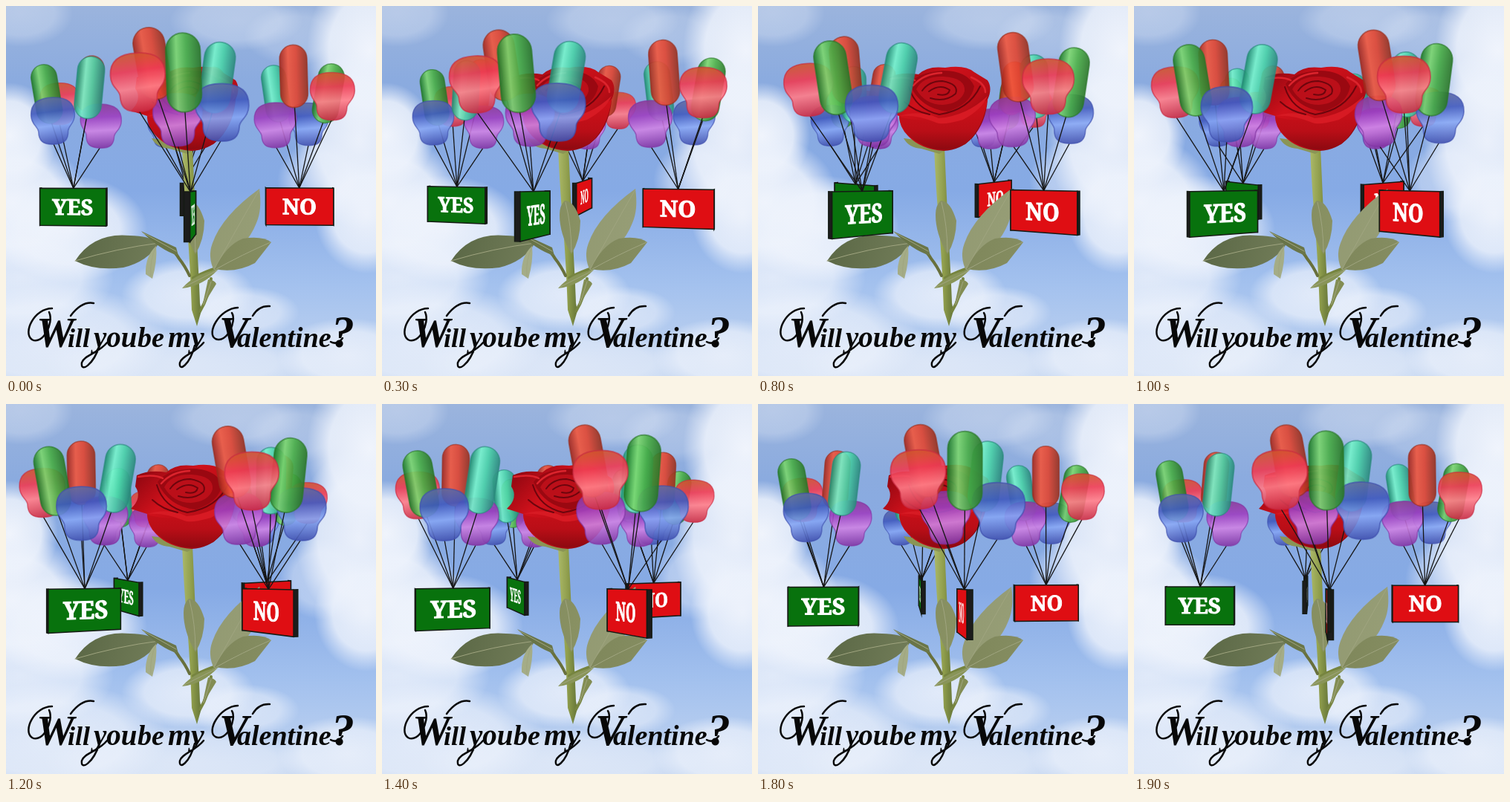
Recreate the animation shown at these times as an HTML page with a canvas. Size 498x498 px, loop 2 s.

```html
<!DOCTYPE html>
<html lang="en">
<head>
<meta charset="utf-8">
<title>Will you be my Valentine?</title>
<style>
html, body { margin: 0; width: 100%; height: 100%; overflow: hidden; background: #9db9e6; }
canvas { display: block; }
</style>
</head>
<body>
<canvas id="stage" width="498" height="498"></canvas>
<script>
const SIZE = 498;
const ctx = document.getElementById('stage').getContext('2d');
const RAD = Math.PI / 180;
const RADIUS = 152, CAMERA = 760, AXIS = 243.5, HORIZON = 204;
const HALF_W = 45, HALF_H = 25, HALF_DEPTH = 3;

// u: outward, v: along the direction of travel, y: relative to the horizon
const BALLOONS = [
  { kind: 'knob', u: 35, v: 51, y: -77, colors: ['#d0552c', '#ee3a52', '#ff7c88', '#c92a42'] },
  { kind: 'tube', u: -12, v: 43, y: -104, colors: ['#a5271d', '#f0553c', '#e04430', '#98301f'] },
  { kind: 'tube', u: 38, v: 4, y: -86, colors: ['#1d7a28', '#7bd66e', '#48ad45', '#2a7728'] },
  { kind: 'tube', u: -29, v: -28, y: -90, colors: ['#1f8f70', '#76f3cb', '#4ad2a8', '#2b8a7d'] },
  { kind: 'knob', u: 17, v: -34, y: -47, colors: ['#5f6aa0', '#3f58bd', '#86a6f4', '#3f4fae'] },
  { kind: 'knob', u: -33, v: 17, y: -43, colors: ['#8c3a96', '#9d3fc0', '#cf83e4', '#8134a4'] }
];

function project(x, z, y = 0) {
  const s = CAMERA / (CAMERA - z);
  return { x: AXIS + x * s, y: HORIZON + y * s, s, z };
}

function signPoint(x, z) {
  return { ...project(x, z), y: 270 + 0.083 * z - 0.000067 * z * z };
}

function fillPath(c, d, fill, stroke, width = 1) {
  const path = new Path2D(d);
  if (fill) { c.fillStyle = fill; c.fill(path); }
  if (stroke) { c.strokeStyle = stroke; c.lineWidth = width; c.stroke(path); }
}

function layer(paint) {
  const canvas = document.createElement('canvas');
  canvas.width = canvas.height = SIZE;
  const c = canvas.getContext('2d');
  c.lineCap = c.lineJoin = 'round';
  paint(c);
  return canvas;
}

function paintSky(c) {
  const sky = c.createLinearGradient(0, 0, 0, SIZE);
  [[0, '#9bb4dd'], [0.2, '#8babdf'], [0.5, '#86aae5'], [0.75, '#a3c1ee'], [1, '#c3d5f0']]
    .forEach(([at, color]) => sky.addColorStop(at, color));
  c.fillStyle = sky;
  c.fillRect(0, 0, SIZE, SIZE);
  const puff = (x, y, rx, ry, alpha) => {
    c.save();
    c.translate(x, y);
    c.scale(rx, ry);
    const g = c.createRadialGradient(0, 0, 0, 0, 0, 1);
    g.addColorStop(0, `rgba(240,244,252,${alpha})`);
    g.addColorStop(0.65, `rgba(238,243,252,${alpha * 0.85})`);
    g.addColorStop(1, 'rgba(235,241,252,0)');
    c.fillStyle = g;
    c.fillRect(-1, -1, 2, 2);
    c.restore();
  };
  [[5, 175, 65, 72, 1], [10, 265, 100, 90, 1], [85, 300, 105, 72, 0.95], [20, 365, 125, 75, 0.8],
   [490, 60, 85, 115, 1], [475, 180, 85, 120, 0.95], [485, 280, 70, 80, 0.95], [425, 235, 60, 55, 0.5],
   [245, 388, 90, 48, 0.8], [320, 412, 75, 35, 0.6], [60, 450, 160, 75, 0.75], [240, 480, 190, 45, 0.6],
   [460, 470, 95, 50, 0.8], [310, 20, 90, 40, 0.35], [20, 10, 70, 45, 0.35], [390, 40, 70, 40, 0.25]]
    .forEach(p => puff(...p));
}

function paintRose(c) {
  const stem = c.createLinearGradient(238, 0, 262, 0);
  stem.addColorStop(0, '#a9b766');
  stem.addColorStop(0.5, '#8f9d4c');
  stem.addColorStop(1, '#68783a');
  fillPath(c, 'M237 190 L251 190 Q254 260 257 320 Q260 370 261 400 L263 410 L257 431 L250 409 Q248 350 244 300 Q239 240 237 190Z', stem);
  fillPath(c, 'M204 319 Q224 324 233 340 Q241 350 247 363', null, '#68703c', 4);
  fillPath(c, 'M252 366 Q269 357 286 352 M276 367 Q273 391 261 411', null, '#76843f', 4);

  const leaf = (d, vein, light, dark) => {
    const g = c.createLinearGradient(100, 300, 350, 360);
    g.addColorStop(0, light);
    g.addColorStop(1, dark);
    fillPath(c, d, g);
    fillPath(c, vein, null, '#a0a580', 1);
  };
  leaf('M93 343 Q118 304 167 309 Q192 309 206 319 Q191 344 158 352 Q120 357 93 343Z', 'M93 343 Q150 326 206 319', '#5b6846', '#8f9770');
  leaf('M182 303 Q203 313 229 325 L232 336 Q208 329 182 303Z', 'M184 305 L229 330', '#5e6b42', '#76804f');
  leaf('M202 323 Q187 337 188 361 L197 367 Q204 342 202 323Z', 'M202 324 Q193 342 195 363', '#a7af86', '#a0a888');
  leaf('M246 262 Q259 262 267 289 Q267 314 255 334 Q239 307 239 281 Q239 268 246 262Z', 'M247 264 Q255 296 255 331', '#7b855a', '#919868');
  leaf('M341 246 Q345 274 337 292 Q325 324 280 356 Q271 337 278 319 Q291 282 341 246Z', 'M341 247 Q313 295 281 353', '#8b9369', '#979e77');
  leaf('M357 318 Q345 309 319 313 Q296 322 281 354 Q309 360 335 346Z', 'M356 318 Q317 335 283 354', '#70794c', '#858d61');
  leaf('M285 355 Q254 360 237 380 Q265 377 285 355Z', 'M284 356 L240 378', '#8c985c', '#879356');
  leaf('M272 368 Q281 369 283 374 L264 405Z', 'M276 371 L266 402', '#97a05e', '#7b8650');

  fillPath(c, 'M196 178 Q203 191 220 192 L244 199 L260 190 Q231 182 196 178Z', '#8a9556');
  const cup = c.createLinearGradient(180, 90, 285, 195);
  cup.addColorStop(0, '#8f0711');
  cup.addColorStop(0.35, '#cf111b');
  cup.addColorStop(0.7, '#b80d16');
  cup.addColorStop(1, '#7e0710');
  fillPath(c, 'M176 96 Q193 88 216 92 Q228 80 252 83 Q279 79 291 89 L309 100 Q316 111 309 126 Q307 156 289 177 Q273 194 250 195 Q219 193 202 175 Q190 163 190 148 L168 141 Q184 126 174 111Z', cup);
  const body = c.createLinearGradient(0, 130, 0, 194);
  body.addColorStop(0, '#cf1019');
  body.addColorStop(0.6, '#b90e17');
  body.addColorStop(1, '#8c0910');
  fillPath(c, 'M190 149 Q192 171 216 184 Q244 201 279 186 Q304 164 309 125 Q287 148 255 150 Q222 158 190 149Z', body);
  fillPath(c, 'M190 148 Q219 139 243 151 Q281 148 309 121 Q302 139 276 153 Q248 161 240 157 Q214 146 190 148Z', '#d71a23');
  fillPath(c, 'M204 105 Q215 89 249 87 Q282 87 291 108 Q287 132 255 142 Q218 138 204 105Z', '#9a0811');
  fillPath(c, 'M213 112 Q222 94 250 95 Q280 97 278 115 Q273 131 249 133 Q225 133 213 112Z', '#bb0f19');
  fillPath(c, 'M221 114 Q230 101 248 101 Q271 105 266 118 Q252 130 232 124 M230 115 Q245 104 258 113 Q256 122 242 119 M203 109 Q212 139 244 146 Q284 140 299 108 M197 129 Q211 142 231 146', null, '#6d050d', 2);
  fillPath(c, 'M209 107 Q223 91 247 90 M287 96 Q306 104 306 116 M178 98 Q200 94 211 100', null, '#dc242d', 2.5);
}

function paintMessage(c) {
  c.fillStyle = '#080808';
  const word = (text, x, size) => {
    c.font = `italic 700 ${size}px "Liberation Serif", serif`;
    c.fillText(text, x, 459);
  };
  [['W', 41, 57], ['ill', 83, 36], ['you', 118, 39], ['be', 177, 38], ['my', 218, 40],
   ['V', 287, 59], ['alentine', 311, 38]].forEach(w => word(...w));
  fillPath(c, 'M62 407 C38 407 22 440 35 449 C49 457 65 427 58 412 M87 417 Q102 397 118 400 M312 406 C287 407 269 441 282 448 C297 455 311 424 304 413 M332 417 Q340 403 355 404 M126 457 C117 484 100 494 102 480 C105 470 125 467 136 453 M254 457 C247 484 232 493 234 480 C237 470 255 467 266 453 M437 452 Q446 457 453 447', null, '#080808', 2.5);
  c.font = 'italic 700 62px "Liberation Serif", serif';
  c.fillText('?', 438, 459);
}

const sky = layer(paintSky);
const rose = layer(paintRose);
const message = layer(paintMessage);
const knob = new Path2D('M0 -30 C17 -30 28 -24 28 -8 C28 4 20 6 19 13 C19 25 14 30 0 30 C-14 30 -19 25 -19 13 C-20 6 -28 4 -28 -8 C-28 -24 -17 -30 0 -30Z');
const tube = new Path2D();
tube.roundRect(-17.5, -40, 35, 80, 17.5);

function drawBalloon(balloon, p, anchor) {
  const isKnob = balloon.kind === 'knob';
  const tilt = Math.atan2(p.x - anchor.x, anchor.y - p.y) * (isKnob ? 0.1 : 0.6);
  const half = (isKnob ? 30 : 39) * p.s;
  ctx.strokeStyle = '#161616';
  ctx.lineWidth = 1.3;
  ctx.beginPath();
  ctx.moveTo(anchor.x, anchor.y);
  ctx.lineTo(p.x - Math.sin(tilt) * half, p.y + Math.cos(tilt) * half);
  ctx.stroke();

  ctx.save();
  ctx.translate(p.x, p.y);
  ctx.rotate(tilt);
  ctx.scale(p.s, p.s);
  const g = isKnob ? ctx.createLinearGradient(-3, -30, 3, 30) : ctx.createLinearGradient(-17, 0, 17, 0);
  balloon.colors.forEach((color, i) => g.addColorStop([0, 0.3, 0.6, 1][i], color));
  ctx.globalAlpha = 0.9;
  ctx.fillStyle = g;
  const shape = isKnob ? knob : tube;
  ctx.fill(shape);
  ctx.globalAlpha = 0.6;
  ctx.strokeStyle = balloon.colors[3];
  ctx.lineWidth = 1.5;
  ctx.stroke(shape);
  ctx.restore();
}

function quad(a, b, fill) {
  ctx.beginPath();
  [[a, -1], [b, -1], [b, 1], [a, 1]].forEach(([p, side]) => ctx.lineTo(p.x, p.y + side * HALF_H * p.s));
  ctx.closePath();
  ctx.fillStyle = fill;
  ctx.fill();
  ctx.strokeStyle = '#151b14';
  ctx.lineWidth = 1.5;
  ctx.stroke();
}

function drawSign(at) {
  const corner = (u, v) => signPoint(...at(u, v));
  const yes = corner(HALF_W, 0).x < corner(-HALF_W, 0).x;
  const front = yes ? -HALF_DEPTH : HALF_DEPTH;
  const outer = corner(HALF_W, front), inner = corner(-HALF_W, front);
  quad(outer, corner(HALF_W, -front), '#1c1c1c');
  quad(inner, corner(-HALF_W, -front), '#1c1c1c');
  const [left, right] = yes ? [outer, inner] : [inner, outer];
  if (right.x <= left.x) return;
  quad(left, right, yes ? '#08720d' : '#df0e13');

  const mid = corner(0, front);
  ctx.save();
  ctx.transform((right.x - left.x) / 90, (right.y - left.y) / 90, 0, mid.s, mid.x, mid.y);
  ctx.fillStyle = ctx.strokeStyle = '#fff';
  ctx.lineWidth = 1;
  ctx.font = '900 29px "Noto Serif", serif';
  ctx.textAlign = 'center';
  const label = yes ? 'YES' : 'NO';
  ctx.fillText(label, 0, 10.5);
  ctx.strokeText(label, 0, 10.5);
  ctx.restore();
}

function drawCluster({ x, z, facing }) {
  const sin = Math.sin(facing), cos = Math.cos(facing);
  const at = (u, v) => [x - u * sin - v * cos, z + u * cos - v * sin];
  drawSign(at);
  const anchor = signPoint(x, z);
  anchor.y -= HALF_H * anchor.s;
  BALLOONS.map(b => ({ b, p: project(...at(b.u, b.v), b.y) }))
    .sort((m, n) => m.p.z - n.p.z)
    .forEach(({ b, p }) => drawBalloon(b, p, anchor));
}

function render(time) {
  const step = Math.floor(time % 2000 / 100);
  const clusters = [0, 90, 180, 270].map(offset => {
    const angle = (offset + step * 4.5 - 1.4) * RAD;
    return { x: -RADIUS * Math.sin(angle), z: RADIUS * Math.cos(angle), facing: angle + 6 * RAD };
  }).sort((a, b) => a.z - b.z);
  ctx.drawImage(sky, 0, 0);
  clusters.filter(c => c.z < 0).forEach(drawCluster);
  ctx.drawImage(rose, 0, 0);
  clusters.filter(c => c.z >= 0).forEach(drawCluster);
  ctx.drawImage(message, 0, 0);
}

const start = performance.now();
function tick() {
  render(performance.now() - start);
  requestAnimationFrame(tick);
}
tick();
</script>
</body>
</html>
```
